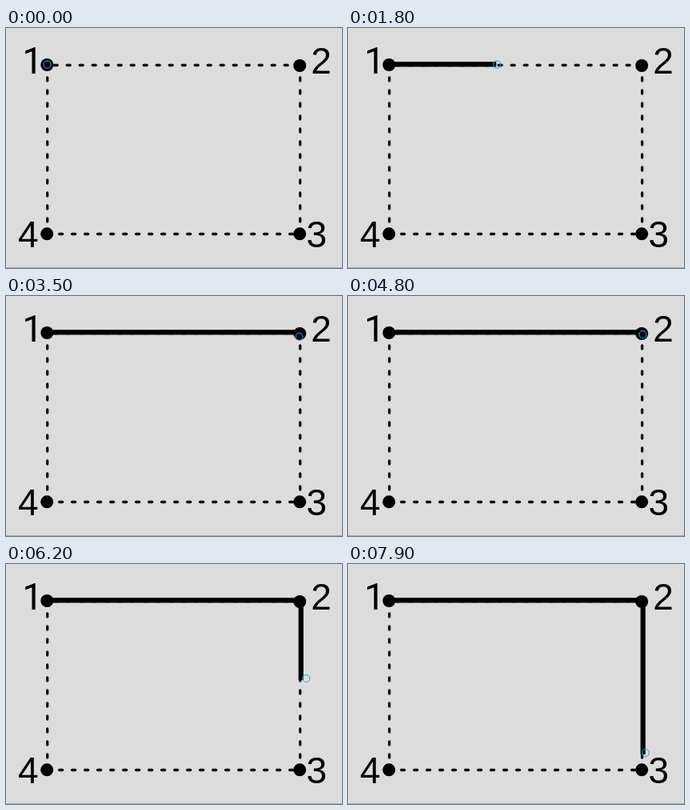
An HTML page that plays this animation: 420x300 px, repeating every 8000 ms.

```html
<!DOCTYPE html>
<html lang="en">
<head>
<meta charset="utf-8">
<title>Tracing a rectangle</title>
<style>
html, body { margin: 0; width: 100%; height: 100%; overflow: hidden; background: #dcdcdc; }
svg { display: block; width: 100vw; height: 100vh; }
text { font: 46px "Liberation Sans", Arial, sans-serif; }
.one { font-family: Roboto, sans-serif; }
.dash { stroke: #101010; stroke-width: 3.3; stroke-linecap: round; stroke-dasharray: 4 12; filter: url(#soft); }
.ink { stroke: #000; stroke-width: 6.2; filter: url(#soft); }
</style>
</head>
<body>
<svg viewBox="0 0 420 300">
  <defs>
    <filter id="soft" filterUnits="userSpaceOnUse" x="0" y="0" width="420" height="300">
      <feGaussianBlur stdDeviation="0.75"/>
    </filter>
  </defs>
  <rect width="420" height="300" fill="#dcdcdc"/>
  <rect y="299" width="420" height="1" fill="#aaa"/>
  <g class="dash">
    <path d="M60.2 46.5H360"/>
    <path d="M66.6 257.5H360"/>
    <path d="M51.7 62V250"/>
    <path d="M367.7 62V250"/>
  </g>
  <path id="top" class="ink"/>
  <path id="side" class="ink"/>
  <circle cx="51.3" cy="46" r="8"/>
  <circle cx="367.2" cy="47" r="8"/>
  <circle cx="367.2" cy="257.3" r="8"/>
  <circle cx="51.2" cy="257.3" r="8"/>
  <text class="one" x="20.2" y="57">1</text>
  <text x="381.3" y="57">2</text>
  <text x="375.5" y="274">3</text>
  <text x="15" y="273.5">4</text>
  <circle id="cursor" r="4.5" fill="none" stroke="#38a4e0" stroke-width="1.1"/>
</svg>
<script>
const LOOP = 8000, STEP = 100, TURN = 4800;

// key points of the pen: time, x, y
const keys = [
  [300, 51.5, 45.7], [1200, 95, 45.7], [2100, 232, 45.5], [2500, 263, 44.5],
  [2800, 297, 43], [3500, 366.5, 51], [4300, 368.5, 48], [TURN, 368.5, 48],
  [5600, 371, 93], [6500, 377.5, 168], [7900, 372, 236]
];

const get = id => document.getElementById(id);
const topLine = get('top'), sideLine = get('side'), cursor = get('cursor');

function penAt(t) {
  const i = Math.max(1, keys.findIndex(k => k[0] >= t));
  const [t0, x0, y0] = keys[i - 1], [t1, x1, y1] = keys[i];
  const p = Math.max(0, (t - t0) / (t1 - t0));
  return [x0 + (x1 - x0) * p, y0 + (y1 - y0) * p];
}

function draw(time) {
  const t = Math.floor(time % LOOP / STEP) * STEP;
  const [x, y] = penAt(t);
  topLine.setAttribute('d', `M51 45.3H${Math.min(x - 1, 367)}`);
  sideLine.setAttribute('d', t > TURN ? `M368.7 47V${y + 2}` : '');
  cursor.setAttribute('cx', x);
  cursor.setAttribute('cy', y);
}

const start = performance.now();
function tick() {
  draw(performance.now() - start);
  requestAnimationFrame(tick);
}
tick();
</script>
</body>
</html>
```
